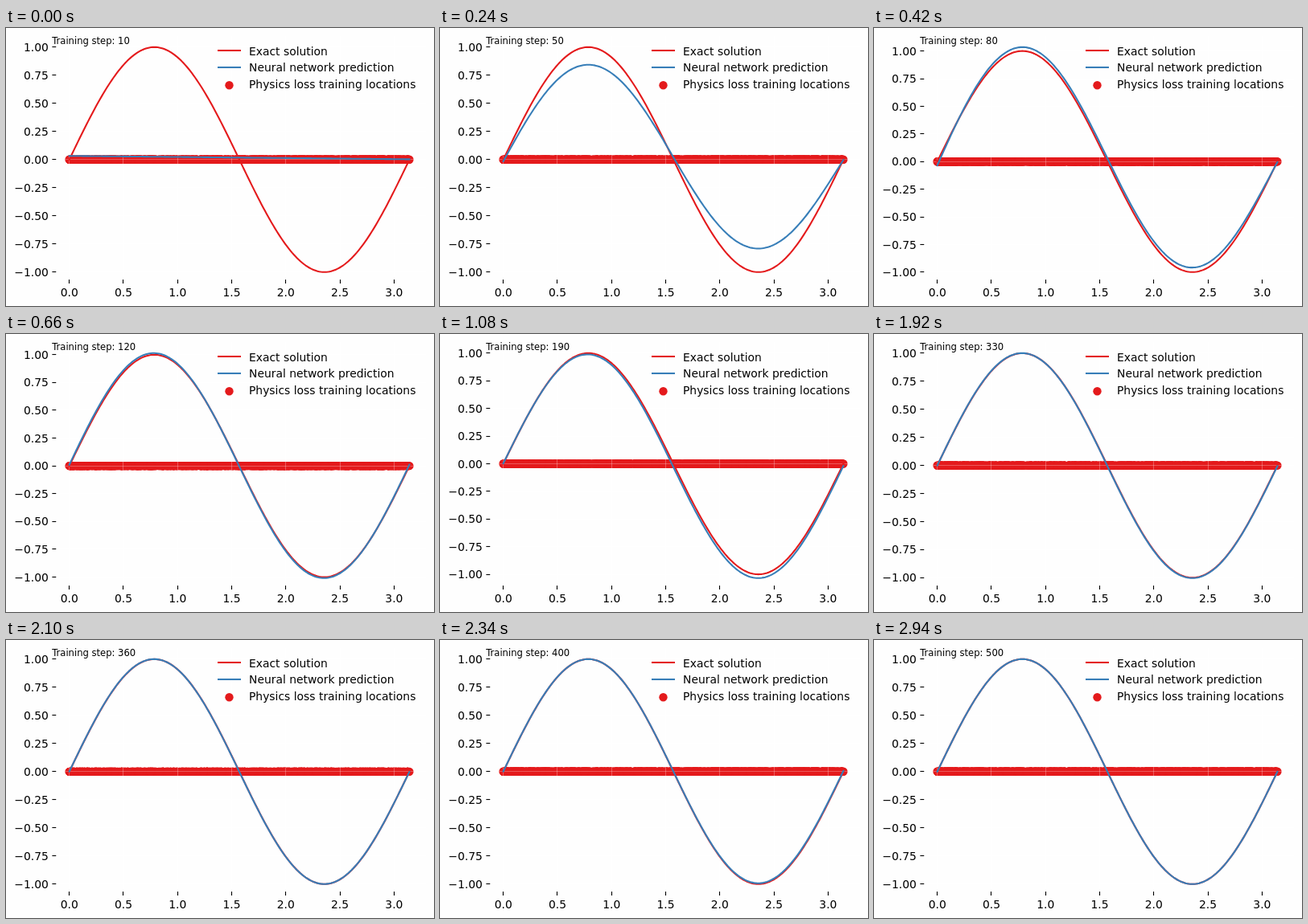
An HTML page with a canvas for the animation above (3 s loop, 532 by 346 pixels).

```html
<!DOCTYPE html>
<html lang="en">
<head>
<meta charset="utf-8">
<title>Neural network training</title>
<style>
html, body { margin: 0; width: 100%; height: 100%; overflow: hidden; background: #fefefe; }
canvas, svg { position: absolute; left: 0; top: 0; width: 532px; height: 346px; }
text { font: 13.89px "DejaVu Sans", sans-serif; fill: #000; }
text.step { font-size: 11.57px; }
</style>
</head>
<body>
<canvas id="plot"></canvas>
<svg id="labels" viewBox="0 0 532 346"></svg>
<script>
const W = 532, H = 346, RED = '#e41a1c', BLUE = '#377eb8';
const LEFT = 57.4, RIGHT = 522, TOP = 9.8, BOTTOM = 318;
const DATA_TOP = 23.8, DATA_BOTTOM = 303.8;
const FRAME_MS = 60, FRAMES = 50;
const LINE = 2.08, THIN = 1.11, TICK = 4.86, RADIUS = 5.2;

const canvas = document.getElementById('plot');
const svg = document.getElementById('labels');
const ratio = window.devicePixelRatio || 1;
canvas.width = W * ratio;
canvas.height = H * ratio;
const ctx = canvas.getContext('2d');
ctx.scale(ratio, ratio);

const px = x => 78.7 + x * 134.56;
const snap = v => Math.floor(v) + 0.5;
const xTicks = Array.from({ length: 7 }, (_, i) => i / 2);
const yTicks = Array.from({ length: 9 }, (_, i) => 1 - i / 4);

function addText(str, x, y, anchor = 'start') {
  const el = document.createElementNS('http://www.w3.org/2000/svg', 'text');
  el.textContent = str;
  el.setAttribute('x', x);
  el.setAttribute('y', y);
  el.setAttribute('text-anchor', anchor);
  svg.appendChild(el);
  return el;
}

const stepLabel = addText('', 57.2, 20);
stepLabel.setAttribute('class', 'step');
addText('Exact solution', 302, 34);
addText('Neural network prediction', 302, 54);
addText('Physics loss training locations', 302, 75);
xTicks.forEach(x => addText(x.toFixed(1), px(x), 334, 'middle'));
const yLabels = yTicks.map(y => addText(y.toFixed(2).replace('-', '\u2212'), 52.9, 0, 'end'));

let seed = 7;
const rand = () => (seed = (seed * 16807) % 2147483647) / 2147483647;
const points = [0, Math.PI, ...Array.from({ length: 1000 }, () => rand() * Math.PI)];

// Training step, then the error at x = 0, pi/4, pi/2, 3pi/4, pi
const errors = [
  [10, 0, 0, 0, 0, 0],
  [80, -0.035, 0.035, 0.03, 0.041, -0.005],
  [130, 0.015, 0.012, -0.01, -0.015, 0.012],
  [190, 0.003, -0.012, -0.03, -0.034, -0.02],
  [230, 0.01, 0, 0.008, 0.022, 0.028],
  [280, -0.006, 0.004, 0.008, 0.006, -0.008],
  [330, 0, 0.001, -0.005, -0.004, -0.006],
  [400, 0.002, 0, 0.002, 0.008, 0.006],
  [450, 0, 0, -0.002, -0.003, -0.002],
  [500, 0, 0, 0, 0, 0]
];
const smooth = u => u * u * (3 - 2 * u);
const clamp = u => Math.max(0, Math.min(1, u));

function errorsAt(step) {
  const i = Math.max(1, errors.findIndex(e => e[0] >= step));
  const a = errors[i - 1], b = errors[i];
  const u = smooth((step - a[0]) / (b[0] - a[0]));
  return a.slice(1).map((v, k) => v + (b[k + 1] - v) * u);
}

// Smooth curve through five evenly spaced values
function blend(values, x) {
  const s = x / Math.PI * 4;
  return values.reduce((sum, v, i) => {
    for (let j = 0; j < 5; j++) if (j !== i) v *= (s - j) / (i - j);
    return sum + v;
  }, 0);
}

const exact = x => Math.sin(2 * x);

function predictor(step) {
  const g = smooth(clamp((step - 10) / 55));
  const err = errorsAt(step);
  return x => (1 - g) * (0.033 - 0.03 * x / Math.PI) + g * exact(x) + blend(err, x);
}

function line(x0, y0, x1, y1, color, width) {
  ctx.strokeStyle = color;
  ctx.lineWidth = width;
  ctx.beginPath();
  ctx.moveTo(x0, y0);
  ctx.lineTo(x1, y1);
  ctx.stroke();
}

function dot(x, y) {
  ctx.fillStyle = RED;
  ctx.beginPath();
  ctx.arc(x, y, RADIUS, 0, 2 * Math.PI);
  ctx.fill();
}

function curve(f, py, color) {
  ctx.strokeStyle = color;
  ctx.lineWidth = LINE;
  ctx.lineCap = 'square';
  ctx.lineJoin = 'round';
  ctx.beginPath();
  for (let i = 0; i <= 200; i++) {
    const x = Math.PI * i / 200;
    ctx.lineTo(px(x), py(f(x)));
  }
  ctx.stroke();
  ctx.lineCap = 'butt';
}

function draw(step) {
  const f = predictor(step);
  let lo = -1, hi = 1;
  for (let i = 0; i <= 200; i++) {
    const v = f(Math.PI * i / 200);
    lo = Math.min(lo, v);
    hi = Math.max(hi, v);
  }
  const py = y => DATA_TOP + (hi - y) / (hi - lo) * (DATA_BOTTOM - DATA_TOP);

  ctx.fillStyle = '#fefefe';
  ctx.fillRect(0, 0, W, H);
  points.forEach(x => dot(px(x), py(0)));

  const grid = 'rgba(255,255,255,0.27)';
  xTicks.forEach(x => {
    const p = snap(px(x));
    line(p, TOP, p, BOTTOM, grid, THIN);
    line(p, BOTTOM - TICK, p, BOTTOM, '#000', THIN);
  });
  yTicks.forEach((y, i) => {
    const p = snap(py(y));
    line(LEFT, p, RIGHT, p, grid, THIN);
    line(LEFT, p, LEFT + TICK, p, '#000', THIN);
    yLabels[i].setAttribute('y', Math.round(py(y) + 5.1));
  });

  curve(exact, py, RED);
  curve(f, py, BLUE);

  line(263, 28, 292, 28, RED, LINE);
  line(263, 49, 292, 49, BLUE, LINE);
  dot(277.5, 71.2);
  stepLabel.textContent = 'Training step: ' + step;
}

const start = performance.now();
let shown = 0;
function tick() {
  const frame = Math.floor((performance.now() - start) / FRAME_MS) % FRAMES;
  const step = 10 * (frame + 1);
  if (step !== shown) draw(shown = step);
  requestAnimationFrame(tick);
}
tick();
</script>
</body>
</html>
```
